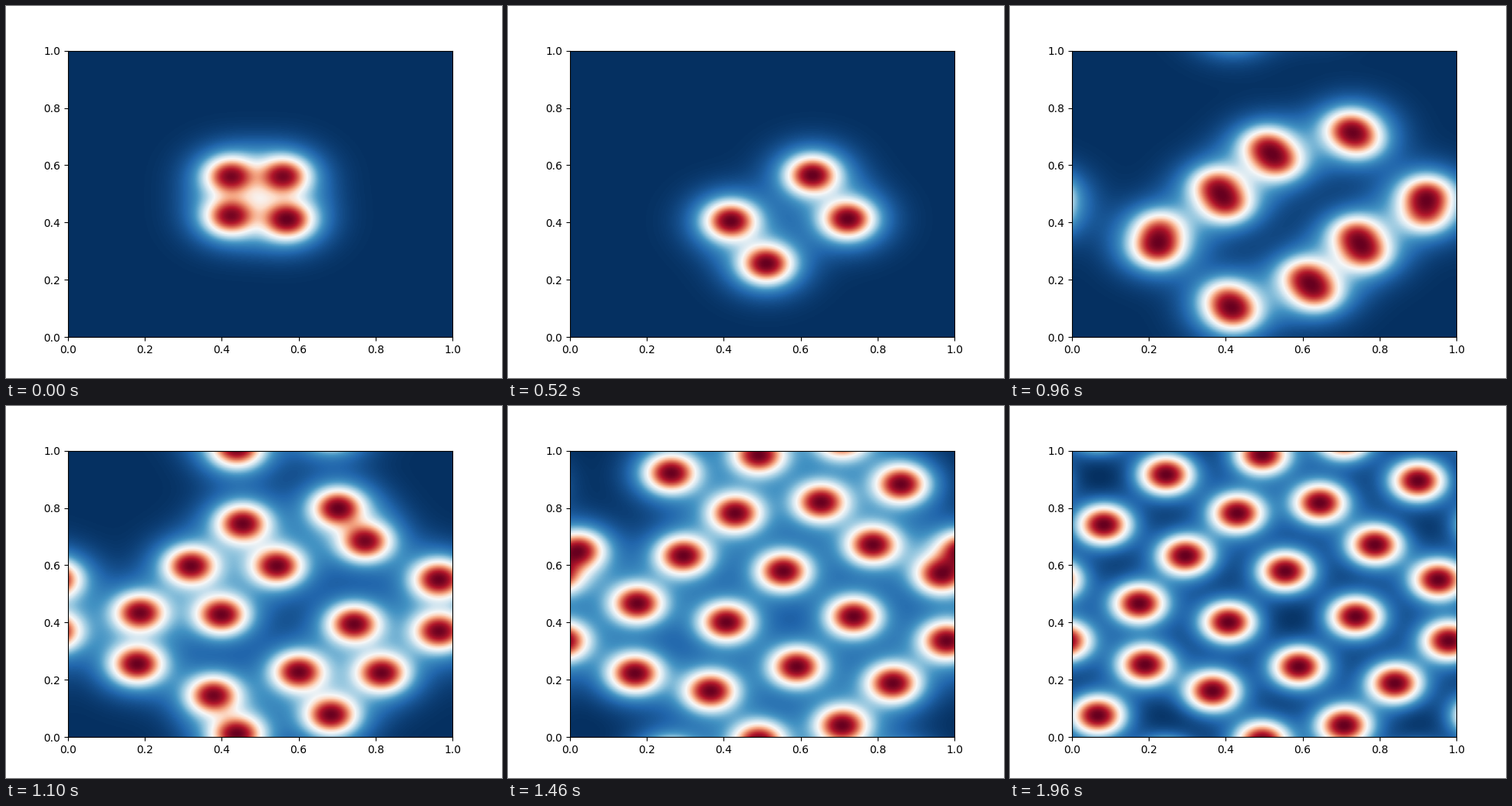
These frames come from a looping animation (640x480 px, 3.98 s). A matplotlib script:

```python
from itertools import product

import numpy as np
import matplotlib.pyplot as plt
from matplotlib.animation import FuncAnimation

FRAMES, STEP, LAST = 199, 20, 98
N = 256
CORE, HALO = (0.8, 0.038), (0.2, 0.075)   # weight, width
GAIN = 1.3                                # flattens the tops of the spots
CENTRE = np.array([0.57, 0.41])

# Resting places of the sixteen spots; siblings are neighbours at every generation.
elders = np.array([
    (0.175, 0.465), (0.190, 0.252), (0.295, 0.632), (0.407, 0.400),
    (0.366, 0.160), (0.495, -0.015), (0.590, 0.245), (0.708, 0.040),
    (0.430, 0.780), (0.555, 0.578), (0.645, 0.816), (0.788, 0.670),
    (0.738, 0.420), (0.840, 0.187), (0.953, 0.548), (0.980, 0.335)])

# Four of them bud once more into the free space, one after the other.
hosts = np.array([5, 10, 14, 1])
buds = np.array([(0.245, -0.085), (0.900, 0.893), (1.083, 0.740), (0.067, 0.075)])
bud_start = 55 + 2 * np.arange(4) ** 2
BUD_TIME = 22

home = elders.copy()
home[hosts] += 0.17 * (buds - elders[hosts])

division_ends = (0, 13, 26, 40, 62)

# Three corners of the opening square die out; the fourth is the ancestor.
corners = np.array(list(product((0.561, 0.423), (0.421, 0.561))))[1:]


def smooth(u):
    u = np.clip(u, 0, 1)
    return u * u * (3 - 2 * u)


def generation(n):
    """Mean place of each of n families, repeated for all its members."""
    return np.repeat(home.reshape(n, -1, 2).mean(1), 16 // n, axis=0)


def positions(t):
    pos = generation(1)
    for k, (start, end) in enumerate(zip(division_ends, division_ends[1:])):
        step = generation(2 ** (k + 1)) - generation(2 ** k)
        pos = pos + step * smooth((t - start) / (end - start))

    # The colony grows outwards from a slightly sheared, half-size layout.
    grown = np.clip((t - 26) / 31, 0, 1)
    lean = 0.25 * (1 - grown)
    shear = np.array([(1, lean), (0.4 * lean, 1)])
    pos = CENTRE + (0.5 + 0.5 * grown) * (pos - CENTRE) @ shear.T

    out = smooth((t - bud_start) / BUD_TIME)[:, None]
    young = pos[hosts] + out * (buds - home[hosts])
    pos[hosts] += out * (elders - home)[hosts]
    return np.vstack([pos, young])


grid = (np.arange(N) + 0.5) / N


def bell(a, b, width):
    d = a[:, None] - b[None, :]
    d -= np.round(d)                      # periodic edges
    return np.exp(-d * d / (2 * width * width))


def splat(points, amps, width):
    gx = bell(points[:, 0], grid, width)
    gy = bell(points[:, 1], grid, width)
    return (gy * amps[:, None]).T @ gx


def field(t):
    spots = positions(t)
    x, y = spots.T
    overlap = sum(a * bell(x, x, s) * bell(y, y, s) for a, s in (CORE, HALO))
    amps = 1 / overlap.sum(1)             # merged spots share one height
    fade = 1 - smooth(t / 7)
    spots = np.vstack([spots, corners])
    amps = np.append(amps, np.full(3, 0.92 * fade))
    v = np.tanh(GAIN * sum(a * splat(spots, amps, s) for a, s in (CORE, HALO)))
    v -= v.min()
    return v / v.max()


fig, ax = plt.subplots(figsize=(6.4, 4.8), dpi=100)
image = ax.imshow(field(0), cmap="RdBu_r", vmin=0, vmax=1, origin="lower",
                  extent=(0, 1, 0, 1), aspect="auto")


def draw(i):
    image.set_data(field(min(i, LAST)))
    return [image]


anim = FuncAnimation(fig, draw, frames=FRAMES, interval=STEP, repeat=True,
                     repeat_delay=0, blit=False)
plt.show()
```
